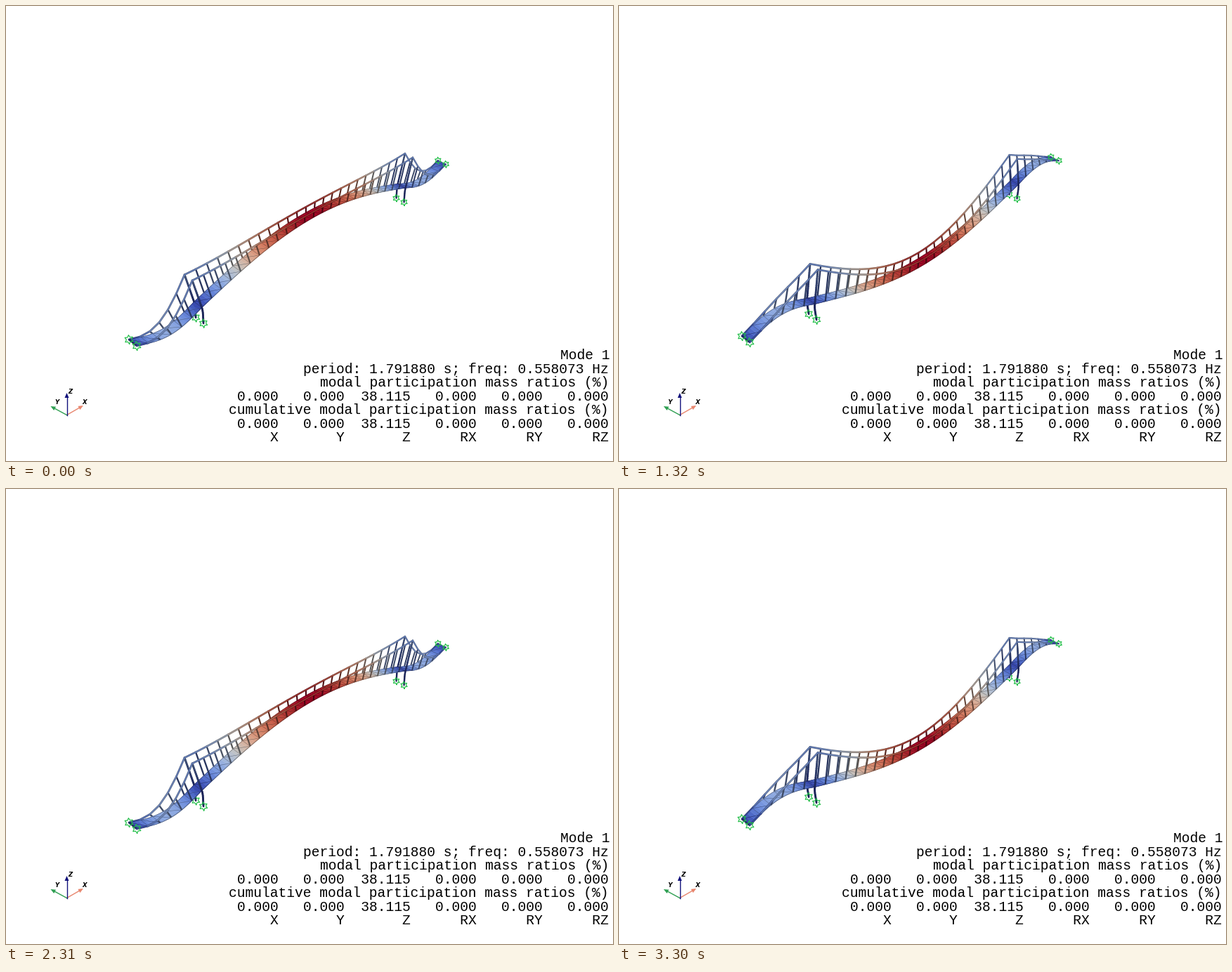
A matplotlib script for the animation above (3.63 s loop, 864 px wide and 648 px high).

```python
import numpy as np
import matplotlib.pyplot as plt
from matplotlib.animation import FuncAnimation
from matplotlib.collections import LineCollection, PolyCollection

W, H = 864, 648
SIDE = 1 / 6            # side span as a share of the deck length
PANELS = 36
TOP, BASE = 45, -23     # pylon ends relative to the deck
SLOPE = -0.5795
CMAP = plt.get_cmap("coolwarm")

fig = plt.figure(figsize=(W / 72, H / 72), dpi=72, facecolor="white")
ax = fig.add_axes([0, 0, 1, 1])
ax.set(xlim=(0, W), ylim=(H, 0))
ax.axis("off")


def depth(s):
    return 1 + 0.335 * np.asarray(s, float)


def main_pos(s):
    return (s - SIDE) / (1 - 2 * SIDE)


def deck_lift(s, sign):
    """Vertical mode shape: main span against the side spans."""
    end = np.minimum(s, 1 - s) / SIDE
    main = 38 * np.sin(np.pi * main_pos(s))
    return sign * np.where(end < 1, -11.8 * np.sin(np.pi * end), main)


def lean(s, sign):
    return sign * 10 * np.interp(s, [0, SIDE, 1 - SIDE, 1], [0, -1, 1, 0])


def cable_height(s):
    end = np.minimum(s, 1 - s) / SIDE
    main = 8.6 + (TOP - 8.6) * (2 * main_pos(s) - 1) ** 2
    return np.where(end < 1, TOP * end ** 2, main)


def project(s, z, u, front, sign):
    """Bridge coordinates to stage pixels."""
    s, z, u = np.broadcast_arrays(np.asarray(s, float), z, u)
    d = depth(s)
    x = (175 * (1 - s) + 615 * 1.335 * s) / d
    y = 470 + (x - 175) * SLOPE + (5 if sign > 0 else 0)
    z, u = z / np.sqrt(d), u / d ** 2
    px = x + 0.00073 * (x - 413) * z + u + 11 * front
    py = y - z + SLOPE * u + front * (9 - 3.7 * (x - 175) / 440)
    return np.stack([px, py], axis=-1)


def tint(value, shade):
    rgba = CMAP(np.clip(value, 0, 1))
    rgba[..., :3] *= shade
    return rgba


def chain(p):
    return np.stack([p[:-1], p[1:]], axis=1)


def lines(segs, colors, widths, **kw):
    return ax.add_collection(LineCollection(
        segs, colors=colors, linewidths=widths, zorder=2, **kw))


def star(center, r):
    a = np.arange(13) * np.pi / 6 + 0.1
    rad = np.where(np.arange(13) % 2, 0.56 * r, r)
    pts = center + np.c_[rad * np.sin(a), rad * np.cos(a)]
    return ax.plot(*pts.T, color="#22bf48", lw=1.2, zorder=2)[0]


def legs(front, sign):
    z = np.linspace(BASE, TOP, 24)
    g = z / TOP * np.where(z < 0, (1 + z / -BASE) ** 2, 1)
    parts = []
    for s in (SIDE, 1 - SIDE):
        p = project(s, z, lean(s, sign) * g, front, sign)
        col = tint(np.abs(g[1:]) * 0.25, 0.45)
        parts.append(lines(chain(p), col, 3 / depth(s), capstyle="round"))
        parts.append(star(p[0], 6.4 / depth(s)))
    return parts


def cable(front, sign):
    s = np.arange(PANELS + 1) / PANELS
    z, u = deck_lift(s, sign), lean(s, sign)
    top = project(s, z + cable_height(s), u, front, sign)
    foot = project(s, z, 0, front, sign)
    inner = np.ones(PANELS + 1, bool)
    inner[[0, 6, 30, 36]] = False
    hang = np.stack([foot, top], axis=1)[inner]
    amp = np.hypot(z, u) / 38
    mid = (amp[1:] + amp[:-1]) / 2
    wide = 2.8 / depth(s)
    return [
        lines(hang, tint(np.abs(z[inner]) / 38, 0.4), wide[inner] * 0.88),
        lines(chain(top), tint(mid, 0.48), wide[1:], capstyle="round"),
        lines(chain(top), tint(mid * 0.9, 0.76), wide[1:] * 0.5, capstyle="round"),
    ]


def deck(sign):
    s = np.linspace(0, 1, 4 * PANELS + 1)
    z = deck_lift(s, sign)
    back, front = (project(s, z, 0, f, sign) for f in (0, 1))
    quads = np.stack([back[:-1], back[1:], front[1:], front[:-1]], axis=1)
    amp = np.abs(z[1:] + z[:-1]) / 76
    fill = tint(amp, 0.88)
    edge = tint(amp, 0.5)
    b, f = back[::4], front[::4]
    ribs = np.concatenate([np.stack([b, f], 1), np.stack([b[:-1], f[1:]], 1)])
    rib_amp = np.abs(np.r_[z[::4], z[:-1:4]]) / 38
    return [
        ax.add_collection(PolyCollection(quads, facecolors=fill,
                                         edgecolors=fill, linewidths=0.4, zorder=2)),
        lines(ribs, tint(rib_amp, 0.5), 0.5),
        lines(chain(back), edge, 0.7),
        lines(chain(front), edge, 0.9),
        lines([[b[0], f[0]]], "#1c2560", 2.5),
    ]


def bridge(sign):
    parts = legs(0, sign) + cable(0, sign) + deck(sign)
    parts += legs(1, sign) + cable(1, sign)
    for s in (0, 1):
        for front in (0, 1):
            parts.append(star(project(s, 0, 0, front, sign), 6.4 / depth(s)))
    return parts


def triad():
    o = np.array([86.5, 582.5])
    arrows = [("X", (110, 569), (111.5, 564.5), "#e8866e"),
              ("Y", (63.5, 570), (72.5, 564.5), "#2f9f52"),
              ("Z", (86.5, 551), (91, 550), "#12127c")]
    for name, tip, label, color in arrows:
        tip = np.array(tip)
        d = (tip - o) / np.hypot(*(tip - o))
        n = np.array([-d[1], d[0]])
        neck = tip - 7 * d
        ax.plot(*np.array([o, neck]).T, color=color, lw=1.4)
        ax.fill(*np.array([tip, neck + 3 * n, neck - 3 * n]).T, color=color, lw=0)
        ax.text(*label, name, family="DejaVu Sans", size=8.5, weight="bold",
                style="italic", ha="center", va="center")


def caption():
    ratios = ["0.000", "0.000", "38.115", "0.000", "0.000", "0.000"]
    row = "".join(f"{v:>8}" for v in ratios).strip()
    axes = "".join(f"{v:>8}" for v in ["X", "Y", "Z", "RX", "RY", "RZ"]).strip()
    text = ["Mode 1",
            "period: 1.791880 s; freq: 0.558073 Hz",
            "modal participation mass ratios (%)", row,
            "cumulative modal participation mass ratios (%)", row, axes]
    for i, line in enumerate(text):
        ax.text(860 - 11.81 * len(line), 503.3 + 19.5 * i, line,
                family="Liberation Mono", size=19.68, va="baseline")


triad()
caption()
up, down = bridge(1), bridge(-1)


def update(i):
    sagging = i >= 2 and i % 2 == 0
    for part in up:
        part.set_visible(not sagging)
    for part in down:
        part.set_visible(sagging)
    return up + down


anim = FuncAnimation(fig, update, frames=11, interval=330,
                     repeat=True, repeat_delay=0, blit=False)
plt.show()
```
